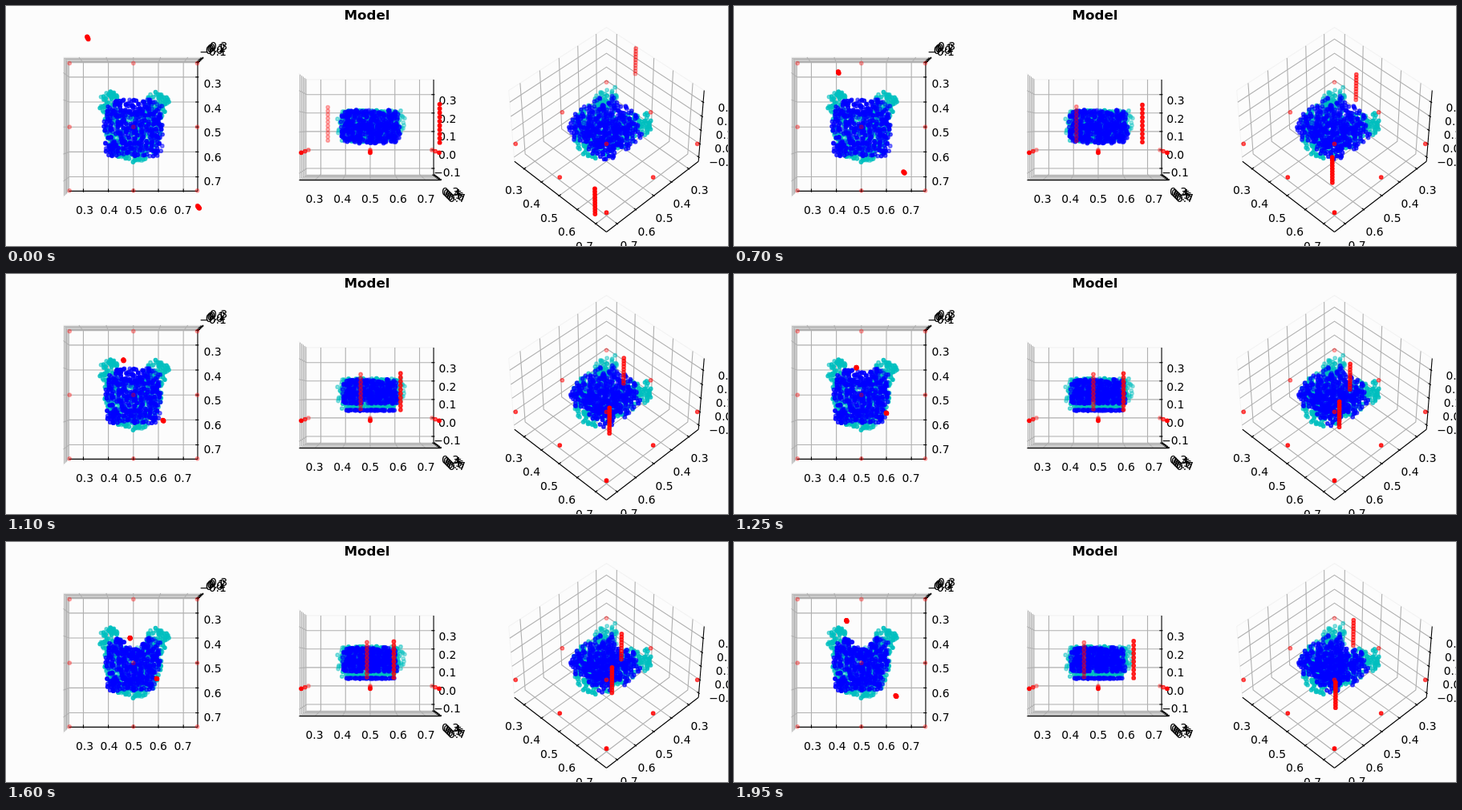
Animation of 900 by 300 pixels, one loop 2 s. Source, as an HTML page with a canvas:

```html
<!DOCTYPE html>
<html lang="en">
<head>
<meta charset="utf-8">
<title>Model</title>
<style>
html, body { margin: 0; width: 100%; height: 100%; overflow: hidden; background: #fcfcfc; }
canvas { display: block; width: 900px; height: 300px; }
</style>
</head>
<body>
<canvas id="stage" width="900" height="300"></canvas>
<script>
const ctx = document.getElementById('stage').getContext('2d');
const FONT = '"DejaVu Sans", sans-serif';
const STEP = 50, STEPS = 40, TURN = 29;
const HALF = 0.257, Z_MID = 0.1245, Z_SCALE = 0.75;
const ZOOM = 325, PERSPECTIVE = 0.22, CY = 151.2;
const TAU = Math.PI * 2;

// Label lines run from the first tick to the last: [x1, y1, x2, y2].
const views = [
  { cx: 158.8, turn: 0, tilt: 90,
    u: [98, 255, 220.5, 255], v: [257.5, 97, 257.5, 219], z: [258, 56.5, 265, 50] },
  { cx: 454, turn: 0, tilt: 0,
    u: [384.5, 241, 523.5, 241], v: [554, 231.5, 562, 239.5], z: [550, 208, 550.5, 118] },
  { cx: 748.5, turn: 45, tilt: 45,
    u: [633, 230, 721, 299.5], v: [864.5, 230, 776.5, 299], z: [893, 195, 898.5, 127] }
];
for (const view of views) {
  const turn = view.turn * Math.PI / 180, tilt = view.tilt * Math.PI / 180;
  Object.assign(view, { ct: Math.cos(turn), st: Math.sin(turn), ce: Math.cos(tilt), se: Math.sin(tilt) });
}

// u and v are measured from the middle of the box; z is the plotted height.
function project(view, [u, v, z]) {
  const h = (z - Z_MID) * Z_SCALE;
  const side = u * view.ct - v * view.st;
  const ahead = u * view.st + v * view.ct;
  const depth = ahead * view.ce + h * view.se;
  const scale = ZOOM / (1 - PERSPECTIVE * depth);
  return { x: view.cx + side * scale, y: CY + (ahead * view.se - h * view.ce) * scale, depth };
}

function line(view, color, ...points) {
  ctx.strokeStyle = color;
  ctx.lineWidth = 1.11;
  ctx.beginPath();
  for (const point of points) {
    const p = project(view, point);
    ctx.lineTo(p.x, p.y);
  }
  ctx.stroke();
}

function label(text, x, y) {
  ctx.fillText(text, x, y + 5);
}

function drawAxes(view) {
  const lo = -HALF, hi = HALF, floor = Z_MID - HALF, top = Z_MID + HALF;
  const grid = '#b0b0b0', edge = '#f3f3f3', out = 0.0045, inn = 0.009;

  line(view, edge, [lo, hi, floor], [lo, hi, top], [lo, lo, top], [hi, lo, top]);
  for (let i = 0; i < 5; i++) {
    const t = (i - 2) / 10, z = (i - 1) / 10;
    line(view, grid, [t, lo, top], [t, lo, floor], [t, hi, floor]);
    line(view, grid, [lo, t, top], [lo, t, floor], [hi, t, floor]);
    line(view, grid, [lo, hi, z], [lo, lo, z], [hi, lo, z]);
  }

  line(view, '#000', [lo, hi, floor], [hi, hi, floor]);
  line(view, '#000', [hi, lo, floor], [hi, hi, floor]);
  line(view, '#000', [hi, lo, floor], [hi, lo, top]);

  ctx.fillStyle = '#000';
  ctx.font = '13.89px ' + FONT;
  for (let i = 0; i < 5; i++) {
    const t = (i - 2) / 10, z = (i - 1) / 10;
    line(view, '#000', [t, hi + out, floor], [t, hi - inn, floor]);
    line(view, '#000', [hi + out, t, floor], [hi - inn, t, floor]);
    line(view, '#000', [hi + out, lo, z], [hi - inn, lo, z]);
    const along = ([x1, y1, x2, y2]) => [x1 + (x2 - x1) * i / 4, y1 + (y2 - y1) * i / 4];
    const level = (t + 0.5).toFixed(1);
    label(level, ...along(view.u));
    label(level, ...along(view.v));
    label(z.toFixed(1).replace('-', '\u2212'), ...along(view.z));
  }
}

// Farther points are more transparent, as in a depth-shaded scatter plot.
function scatter(view, points, color) {
  const dots = points.map(p => project(view, p)).sort((a, b) => a.depth - b.depth);
  const near = dots[dots.length - 1].depth, far = dots[0].depth;
  ctx.fillStyle = ctx.strokeStyle = color;
  ctx.lineWidth = 1.39;
  for (const dot of dots) {
    ctx.globalAlpha = 0.3 + 0.7 * (dot.depth - far) / (near - far);
    ctx.beginPath();
    ctx.arc(dot.x, dot.y, 2.2, 0, TAU);
    ctx.fill();
    ctx.stroke();
  }
  ctx.globalAlpha = 1;
}

let seed = 20;
function random() {
  seed = (seed + 0x6D2B79F5) | 0;
  let r = Math.imul(seed ^ (seed >>> 15), 1 | seed);
  r = (r + Math.imul(r ^ (r >>> 7), 61 | r)) ^ r;
  return ((r ^ (r >>> 14)) >>> 0) / 4294967296;
}
const between = (a, b) => a + (b - a) * random();
const ramp = (x, a, b) => Math.min(1, Math.max(0, (x - a) / (b - a)));
const bump = (x, mid, width) => Math.exp(-(((x - mid) / width) ** 2));

function fill(count, make) {
  const points = [];
  while (points.length < count) {
    const p = make();
    if (p) points.push(p);
  }
  return points;
}

// A block with rounded edges and corners.
const clay = fill(480, () => {
  const [a, b, c] = [between(-1, 1), between(-1, 1), between(-1, 1)];
  const inside = a ** 6 + b ** 6 + c ** 6 < 1;
  return inside && [0.001 + 0.114 * a, 0.005 + 0.111 * b, 0.126 + 0.086 * c];
});

const goal = fill(520, () => {
  const [u, v, z] = [between(-0.137, 0.137), between(-0.137, 0.137), between(0.048, 0.21)];
  const ear = Math.hypot(Math.abs(u) - 0.092, v + 0.092) < 0.043 && z > 0.085;
  const width = 0.11 * Math.sqrt(Math.max(0, 1 - (Math.max(0, v) / 0.137) ** 2));
  return (ear || (v > -0.06 && Math.abs(u) < width)) && [u, v, z];
});

const markers = [];
for (const u of [-0.25, 0, 0.25])
  for (const v of [-0.25, 0, 0.25]) markers.push([u, v, 0]);

function rod(u, v) {
  return Array.from({ length: 10 }, (_, i) => [u, v, 0.05 + 0.183 * i / 9]);
}

function shapeClay(step) {
  const settle = ramp(step, 15, 22);
  const notch = ramp(step, 23, 30);
  const dent = ramp(step, 21, 29);
  return clay.map(([u, v, z]) => {
    const rest = z < 0.062 ? 0.046 : 0.079 + (z - 0.062) * 0.84;
    const height = z + (rest - z) * settle;
    const x = u * (1 - 0.06 * settle);
    const y = v * (1 - 0.03 * settle);
    const upper = ramp(y, 0.1, -0.105) ** 1.5;
    const right = ramp(x, -0.03, 0.107);
    return [
      x - 0.022 * dent * right * bump(y, 0.075, 0.05),
      y + 0.05 * notch * upper * bump(x, 0.002, 0.04) - 0.01 * dent * right * ramp(y, 0, 0.1),
      height
    ];
  });
}

function draw(step) {
  ctx.fillStyle = '#fcfcfc';
  ctx.fillRect(0, 0, 900, 300);
  ctx.textAlign = 'center';
  ctx.fillStyle = '#000';
  ctx.font = 'bold 16.67px ' + FONT;
  ctx.fillText('Model', 450, 17);

  const travel = Math.min(step, 2 * TURN - step);
  const tools = [
    ...markers,
    ...rod(-0.1745 + 0.00622 * travel, -0.341 + 0.00946 * travel),
    ...rod(0.2485 - 0.00612 * travel, 0.307 - 0.0095 * travel)
  ];
  const body = shapeClay(step);
  for (const view of views) {
    drawAxes(view);
    scatter(view, goal, 'rgb(0,191,191)');
    scatter(view, body, 'rgb(0,0,255)');
    scatter(view, tools, 'rgb(255,0,0)');
  }
}

const start = performance.now();
let shown = -1;
function tick() {
  const step = Math.floor((performance.now() - start) / STEP) % STEPS;
  if (step !== shown) draw(shown = step);
  requestAnimationFrame(tick);
}
tick();
</script>
</body>
</html>
```
